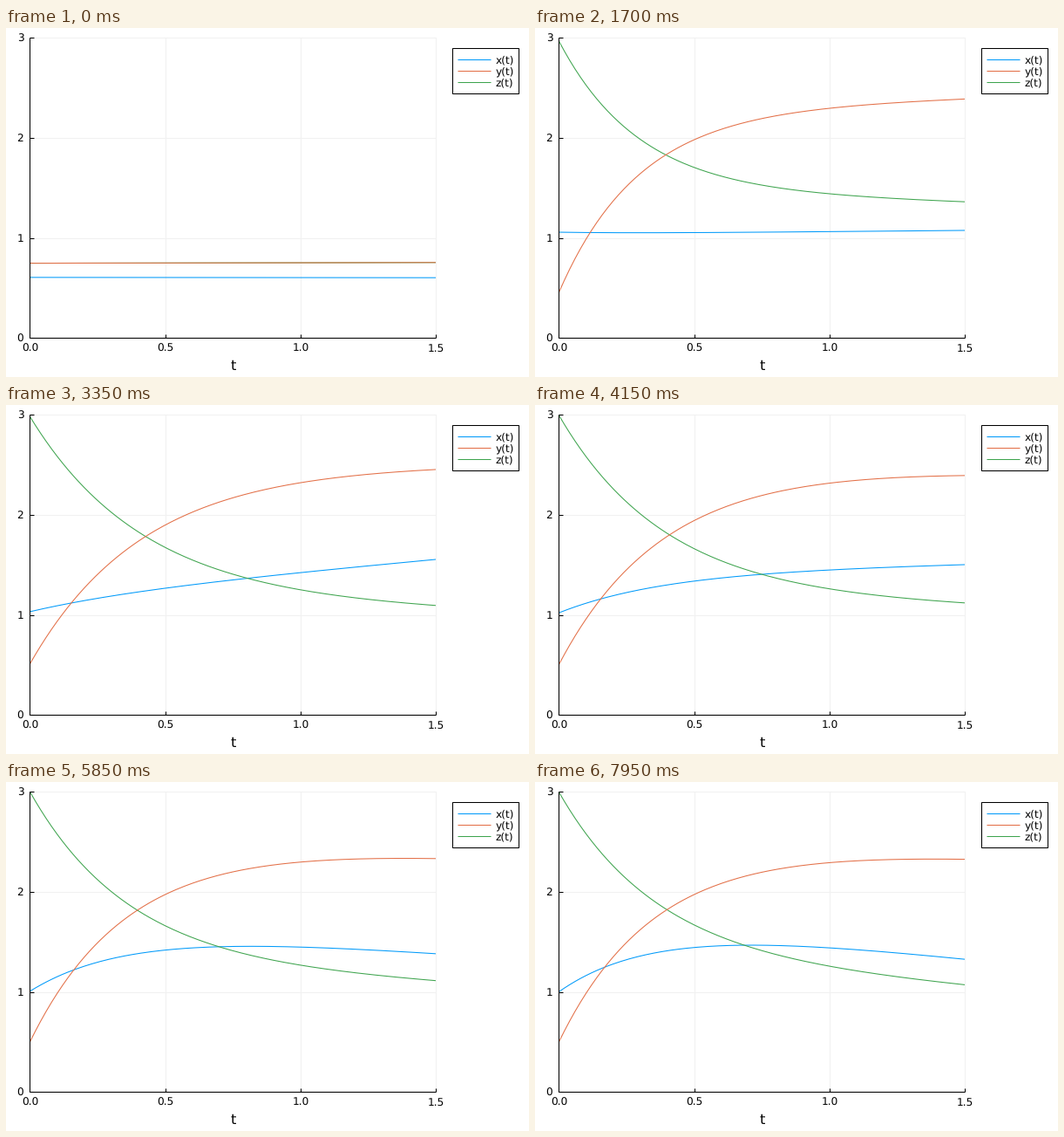
A matplotlib script for the animation above (8 s loop, 600 by 400 pixels).

```python
import numpy as np
import matplotlib.pyplot as plt
from matplotlib.animation import FuncAnimation
from matplotlib.patches import Rectangle

W, H, DPI = 600, 400, 100
FRAMES, INTERVAL = 160, 50
LEFT, RIGHT, TOP, BOTTOM = 27.4, 493.4, 11.45, 355.3
T_MAX, V_MAX = 1.5, 3.0
COLORS = {"x": "#009afa", "y": "#e36f47", "z": "#3ea44e"}
GRID = "#f1f1f1"

plt.rcParams["font.family"] = "DejaVu Sans"
plt.rcParams["text.hinting"] = "none"

# Key poses: ms, decay rate, then the heights of x, y, z at t = 0, 0.5, 1.5.
POSES = np.array([
    (0,    1.0, 0.606, 0.605, 0.603, 0.748, 0.750, 0.755, 0.748, 0.750, 0.755),
    (700,  1.0, 1.250, 1.279, 1.331, 0.968, 1.397, 1.867, 2.140, 2.116, 2.078),
    (1700, 3.4, 1.058, 1.054, 1.076, 0.455, 1.983, 2.390, 2.970, 1.705, 1.362),
    (3350, 2.4, 1.033, 1.268, 1.556, 0.510, 1.900, 2.455, 2.985, 1.675, 1.095),
    (5000, 2.7, 1.013, 1.388, 1.438, 0.500, 1.975, 2.345, 3.005, 1.657, 1.138),
    (7950, 2.8, 1.002, 1.445, 1.327, 0.500, 1.975, 2.327, 3.000, 1.670, 1.072),
])


def clock(ms):
    """Slowing progress: the fit changes fast at first, then settles."""
    return 1 - np.exp(-ms / 2500)


KEYS, VALUES = clock(POSES[:, 0]), POSES[:, 1:]


def key_slopes():
    """Slopes at the keys that keep the motion smooth without overshoot."""
    d = np.diff(VALUES, axis=0) / np.diff(KEYS)[:, None]
    m = np.zeros_like(VALUES)
    m[0] = d[0]
    a, b = d[:-1], d[1:]
    same = a * b > 0
    m[1:-1][same] = 2 * a[same] * b[same] / (a[same] + b[same])
    return m


SLOPES = key_slopes()


def pose_at(ms):
    c = clock(ms)
    i = min(np.searchsorted(KEYS, c, side="right") - 1, len(KEYS) - 2)
    h = KEYS[i + 1] - KEYS[i]
    u = (c - KEYS[i]) / h
    return (
        VALUES[i] * (1 + 2 * u) * (1 - u) ** 2
        + SLOPES[i] * h * u * (1 - u) ** 2
        + VALUES[i + 1] * u**2 * (3 - 2 * u)
        + SLOPES[i + 1] * h * u**2 * (u - 1)
    )


def curve(t, rate, start, mid, end):
    """Exponential approach plus a linear drift through three heights."""
    def rise(s):
        return 1 - np.exp(-rate * s)

    amp = (3 * (mid - start) - (end - start)) / (3 * rise(0.5) - rise(1.5))
    drift = 2 * (mid - start - amp * rise(0.5))
    return start + drift * t + amp * rise(t)


def px(t):
    return LEFT + (RIGHT - LEFT) * t / T_MAX


def py(v):
    return BOTTOM - (BOTTOM - TOP) * v / V_MAX


fig = plt.figure(figsize=(W / DPI, H / DPI), dpi=DPI, facecolor="white")
ax = fig.add_axes([0, 0, 1, 1])
ax.set_xlim(0, W)
ax.set_ylim(H, 0)
ax.axis("off")


def stroke(xs, ys, color="black", width=0.75, z=2):
    return ax.plot(xs, ys, color=color, lw=width, zorder=z, solid_capstyle="butt")[0]


def label(x, y, s, size=8.7, ha="center"):
    ax.text(x, y, s, fontsize=size, ha=ha, va="baseline", color="black")


for t in (0, 0.5, 1.0, 1.5):
    if t:
        stroke([px(t)] * 2, [TOP, BOTTOM], GRID, z=1)
    stroke([px(t)] * 2, [BOTTOM, BOTTOM - 4.5], z=5)
    label(px(t) + 0.2, 371.2, f"{t:.1f}")

for v in range(4):
    if v:
        stroke([LEFT, RIGHT], [py(v)] * 2, GRID, z=1)
    stroke([LEFT, LEFT + 4.5], [py(v)] * 2, z=5)
    label(20.3, py(v) + 4.4, str(v), ha="right")

stroke([LEFT, LEFT], [TOP, BOTTOM], z=5)
stroke([LEFT, RIGHT], [BOTTOM, BOTTOM], z=5)
label((LEFT + RIGHT) / 2 + 0.3, 392, "t", 11.7)

# Legend
ax.add_patch(Rectangle((512, 23), 76, 52, fc="white", ec="black", lw=0.75))
for i, (name, color) in enumerate(COLORS.items()):
    row = 36.3 + 12.9 * i
    stroke([518.3, 556], [row, row], color, z=3)
    label(561.8, row + 4.3, f"{name}(t)", ha="left")

ts = np.linspace(0, T_MAX, 151)
plot_area = Rectangle((LEFT, TOP), RIGHT - LEFT, BOTTOM - TOP, transform=ax.transData)

curves = []
for name, depth in (("x", 3), ("y", 3.2), ("z", 3.1)):
    art = stroke(px(ts), py(0 * ts), COLORS[name], z=depth)
    art.set_clip_path(plot_area)
    curves.append(art)


def update(i):
    rate, *heights = pose_at(i * INTERVAL)
    for n, art in enumerate(curves):
        art.set_ydata(py(curve(ts, rate, *heights[3 * n:3 * n + 3])))
    return curves


anim = FuncAnimation(fig, update, frames=FRAMES, interval=INTERVAL, repeat=True, repeat_delay=0)
plt.show()
```
